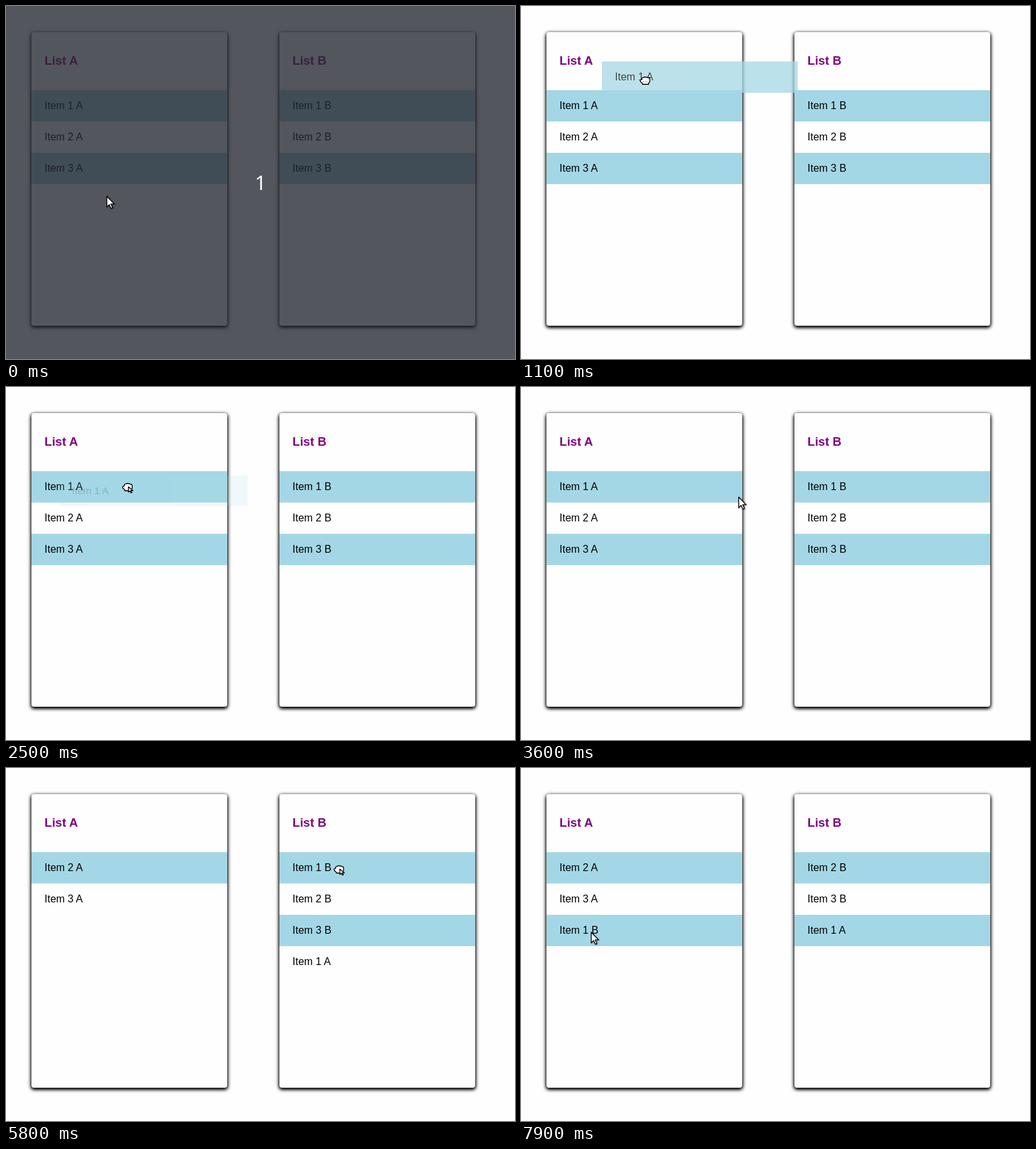
Write an HTML page that moves like this. It is 780x541 px and loops after 8000 ms.

```html
<!DOCTYPE html>
<html lang="en">
<head>
<meta charset="utf-8">
<title>Drag between lists</title>
<style>
  html, body { margin: 0; width: 780px; height: 541px; overflow: hidden; background: #fefefe; }
  body { position: relative; font: 16px "Liberation Sans", Arial, sans-serif; color: #000; }
  .card {
    position: absolute; top: 40px; width: 300px; height: 450px;
    border-radius: 4px; background: #fefefe;
    box-shadow: 0 2px 6px #000, 0 2px 5px #000;
  }
  #a { left: 39px; }
  #b { left: 419px; }
  h3 { margin: 20px 0 21px 20px; font-size: 18.72px; line-height: 48px; color: purple; }
  .item { height: 48px; padding-left: 20px; line-height: 48px; box-sizing: border-box; }
  .item:nth-child(odd), #ghost { background: #a4d7e5; }
  #ghost { position: absolute; left: 0; top: 0; width: 300px; transform-origin: 0 0; }
  #dim {
    position: absolute; inset: 0; background: rgba(37, 41, 49, .79); color: #fff;
    font: 30px/541px "Noto Sans", "Open Sans", sans-serif; text-align: center;
    animation: dim 8s step-end infinite;
  }
  @keyframes dim { 1.25%, 100% { visibility: hidden; } }
  svg { position: absolute; left: 0; top: 0; overflow: visible; }
  path {
    fill: #fff; stroke: #000; stroke-width: 1.3; stroke-linejoin: round;
    vector-effect: non-scaling-stroke;
  }
  #arrow { filter: drop-shadow(1px 1px 1px rgba(0, 0, 0, .3)); }
</style>
</head>
<body>
<div class="card" id="a"><h3>List A</h3><div class="rows"></div></div>
<div class="card" id="b"><h3>List B</h3><div class="rows"></div></div>
<div class="item" id="ghost"></div>
<div id="dim">1</div>
<svg id="pointer" width="20" height="20">
  <defs><path id="tip" d="M.6 .8V17L4.3 13.4L6.9 19.2L9.4 18.1L6.8 12.4H12Z"/></defs>
  <use id="arrow" href="#tip"/>
  <g id="hand" transform="translate(-8 -7.5)">
    <path d="M4 12.5V11L.8 8.2Q.4 5.2 3.4 5V3.2Q4.4 1.4 6.2 2.1Q7.6 .6 9.2 1.8Q10.8 .9 12.2 2.4Q15.2 2.2 15.4 5V8.6L13.6 11V12.5Z"/>
    <path id="fingers" d="M5.6 8V9M8.2 8V9M10.8 8V9" stroke-opacity=".6"/>
    <use id="badge" href="#tip" transform="translate(9.2 6) scale(.62 .5)"/>
  </g>
</svg>
<script>
  const LOOP = 8000, STEP = 100;
  const $ = id => document.getElementById(id);

  // The pointer rests between legs; `via` bends a leg into a quadratic curve.
  const home = [154, 291];
  const legs = [
    { from: 0, until: 100, to: [168, 293] },
    { from: 100, until: 400, to: [159, 239] },
    { from: 500, until: 600, to: [123, 154] },
    { from: 700, until: 900, to: [119, 157] },
    { from: 1000, until: 1700, to: [346, 22] },
    { from: 1800, until: 2400, to: [186, 154] },
    { from: 2500, until: 2700, to: [230, 119] },
    { from: 2700, until: 3300, to: [394, 69], via: [750, 2] },
    { from: 3500, until: 4100, to: [155, 157], via: [321, 267] },
    { from: 4200, until: 4900, to: [514, 154], via: [334, 132] },
    { from: 4900, until: 5000, to: [506, 146] },
    { from: 5700, until: 5800, to: [510, 156] },
    { from: 5800, until: 6600, to: [154, 253] },
    { from: 6600, until: 6700, to: [148, 246] },
    { from: 6900, until: 7200, to: [92, 234] },
    { from: 7300, until: 7900, to: [107, 251], via: [100, 233] }
  ];

  // Each drag takes the first item of a list; one with `to` drops it at that list's end.
  const drags = [
    { press: 900, start: 1100, drop: 2500, release: 2600, grip: [66, 30], list: "a" },
    { press: 4300, start: 4300, drop: 5000, release: 5000, grip: [116, 28], list: "a", to: "b" },
    { press: 5800, start: 5900, drop: 6600, release: 6700, grip: [91, 27], list: "b", to: "a" }
  ];

  const easeOut = f => f ** .6;
  const show = (el, on) => { el.style.display = on ? "" : "none"; };

  function pointerAt(t) {
    let p = home;
    for (const { from, until, to, via } of legs) {
      if (t < from) break;
      const f = easeOut(Math.min(1, (t - from) / (until - from)));
      p = p.map((v, i) => {
        const mid = via ? via[i] : (v + to[i]) / 2;
        return (1 - f) ** 2 * v + 2 * f * (1 - f) * mid + f * f * to[i];
      });
    }
    return p.map(Math.round);
  }

  function listsAt(t) {
    const lists = {};
    for (const id of ["a", "b"])
      lists[id] = [1, 2, 3].map(n => `Item ${n} ${id.toUpperCase()}`);
    for (const d of drags)
      if (d.to && t >= d.drop) lists[d.to].push(lists[d.list].shift());
    return lists;
  }

  function drawGhost(t, x, y, drag, lists) {
    const fading = drag && !drag.to && t >= drag.drop;
    const visible = drag && t >= drag.start && (t < drag.drop || fading);
    const ghost = $("ghost");
    show(ghost, visible);
    if (!visible) return;
    ghost.textContent = lists[drag.list][0];
    ghost.style.opacity = fading ? .16 : .73;
    ghost.style.transform = fading
      ? "translate(82px, 136px) scale(.96)"
      : `translate(${x - drag.grip[0]}px, ${y - drag.grip[1]}px)`;
  }

  function draw(t) {
    const [x, y] = pointerAt(t);
    const lists = listsAt(t);
    const drag = drags.find(d => t >= d.press && t < d.release);
    for (const id in lists)
      $(id).querySelector(".rows").innerHTML =
        lists[id].map(name => `<div class="item">${name}</div>`).join("");

    const overList = y > 129 && (x < 339 || x > 419);
    show($("arrow"), !drag);
    show($("hand"), drag);
    show($("badge"), overList);
    show($("fingers"), !overList);
    $("pointer").style.transform = `translate(${x}px, ${y}px)`;
    drawGhost(t, x, y, drag, lists);
  }

  const begin = performance.now();
  let last = -1;
  function tick() {
    const t = Math.floor((performance.now() - begin) % LOOP / STEP) * STEP;
    if (t !== last) draw(last = t);
    requestAnimationFrame(tick);
  }
  tick();
</script>
</body>
</html>
```
